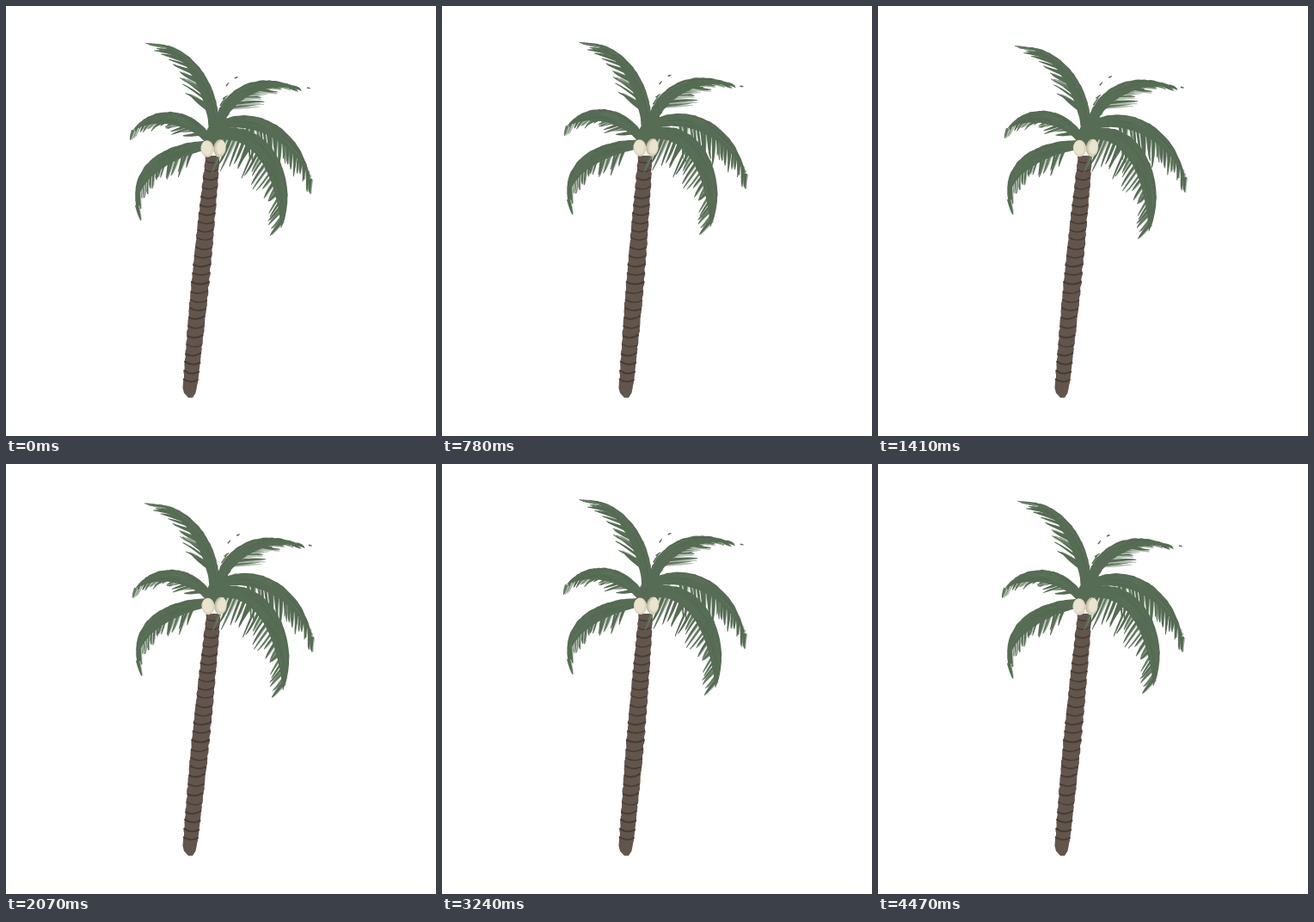
An HTML page with a canvas that plays this animation: 500x500 px, repeating every 4.5 s.

```html
<!DOCTYPE html>
<html lang="en">
<head>
<meta charset="utf-8">
<title>Swaying palm</title>
<style>
  html, body { margin: 0; width: 100%; height: 100%; overflow: hidden; background: #fff; }
  canvas { display: block; width: 100vmin; height: 100vmin; }
</style>
</head>
<body>
<canvas id="stage" width="500" height="500"></canvas>
<script>
const ctx = document.getElementById('stage').getContext('2d');
const LOOP = 4500, STEP = 30;
const KEY_TIMES = [0, 780, 1410, 2070, 2730, 3270, 3780];
const GREEN = '#566c54', DEEP = '#4c634b', SOFT = '#667b63', PALE = '#b4c0b3';
const BARK = '#62554c', RING = '#453b38';

const crownSway = { x: [0, -4, .5, 1, -1, -3.5, -2.5], y: [0, -1, -.5, -.5, 0, -.8, -.5] };

// spine: cubic control points; angle, len: leaflet values from base to tip
const fronds = [
  { spine: [[241, 152], [246, 108], [215, 44], [169, 44]], width: 8, taper: 2.5,
    range: [.2, .88], count: 19, angle: [217, 186], len: [46, 25], seed: 11,
    x: [0, -3, -4, -2, 0, -3, -2], y: [0, -1, 4, 3, 0, -2, -1] },
  { spine: [[245, 148], [252, 100], [298, 80], [343, 97]], width: 7.4, taper: 4,
    range: [.24, .93], count: 16, angle: [-10, 26], len: [40, 15], seed: 29,
    x: [0, -2, 5, 4, 0, -3, -2], y: [0, -4, -1, -1, 0, -4, -3] },
  { spine: [[236, 156], [214, 126], [172, 122], [147, 145]], width: 7.6, taper: 5,
    range: [.1, .99], count: 17, angle: [175, 108], len: [30, 13], seed: 5,
    x: [0, -2, 3, 3, 0, -3, -1], y: [0, -5, -2, 0, 0, -4, -3] },
  { spine: [[234, 162], [196, 166], [148, 188], [152, 234]], width: 8.2, taper: 5,
    range: [.14, .98], count: 19, angle: [114, 78], len: [36, 18], seed: 17,
    x: [0, -5, 0, 1, -2, -5, -4], y: [0, -7, -7, -3, 0, -5, -5] },
  { spine: [[246, 140], [290, 122], [338, 150], [355, 204]], width: 8.2, taper: 4,
    range: [.25, .98], count: 24, angle: [84, 94], len: [50, 19], seed: 41,
    x: [0, -1, 3, 2, 0, -2, 0], y: [0, -6, -2, 0, 0, -4, -4] },
  { spine: [[248, 150], [300, 139], [329, 203], [320, 258]], width: 9.6, taper: 9,
    range: [.06, .95], count: 24, angle: [112, 130], len: [48, 24], seed: 23,
    x: [0, -8, -5, 2, 0, -2, 2], y: [0, -1, 4, 5, 3, 2, 1] }
];

const mix = (a, b, u) => a + (b - a) * u;

function seeded(seed) {
  return () => {
    seed = (seed * 16807) % 2147483647;
    return seed / 2147483647;
  };
}

// Smooth periodic curve through values at KEY_TIMES
function sway(values, t) {
  const n = values.length;
  const time = k => KEY_TIMES[(k + n) % n] + Math.floor(k / n) * LOOP;
  const value = k => values[(k + n) % n];
  const slope = k => (value(k + 1) - value(k - 1)) / (time(k + 1) - time(k - 1));
  let i = n - 1;
  while (KEY_TIMES[i] > t) i--;
  const span = time(i + 1) - time(i), u = (t - time(i)) / span, v = 1 - u;
  return v * v * (1 + 2 * u) * value(i) + u * u * (3 - 2 * u) * value(i + 1)
    + span * u * v * (v * slope(i) - u * slope(i + 1));
}

const offset = (part, t) => [sway(part.x, t), sway(part.y, t)];

function bezier(p, u) {
  const v = 1 - u;
  const at = k => v * v * v * p[0][k] + 3 * v * v * u * p[1][k] + 3 * v * u * u * p[2][k] + u * u * u * p[3][k];
  const d = k => v * v * (p[1][k] - p[0][k]) + 2 * v * u * (p[2][k] - p[1][k]) + u * u * (p[3][k] - p[2][k]);
  const dx = d(0), dy = d(1), len = Math.hypot(dx, dy) || 1;
  return { x: at(0), y: at(1), nx: -dy / len, ny: dx / len };
}

function fillPath(points, color) {
  ctx.fillStyle = color;
  ctx.beginPath();
  points.forEach(([x, y]) => ctx.lineTo(x, y));
  ctx.closePath();
  ctx.fill();
}

function leaflet(x, y, angle, len, half, bend, color) {
  const c = Math.cos(angle), s = Math.sin(angle);
  const at = (along, side) => [x + c * along - s * side, y + s * along + c * side];
  ctx.fillStyle = color;
  ctx.beginPath();
  ctx.moveTo(...at(0, -half));
  ctx.quadraticCurveTo(...at(len * .7, bend - half), ...at(len, -.4));
  ctx.lineTo(...at(len, .4));
  ctx.quadraticCurveTo(...at(len * .7, bend + half), ...at(0, half));
  ctx.fill();
}

function drawFrond(f, crown, t) {
  const tip = offset(f, t), rand = seeded(f.seed * 7919);
  const spine = f.spine.map((p, i) => p.map((c, k) => c + mix(crown[k], tip[k], i / 3)));
  const half = u => f.width * (1 - u ** f.taper) * (.5 + .5 * Math.sin(Math.PI * Math.min(1, u * .9 + .08)));

  for (let i = 0; i < f.count; i++) {
    const k = i / (f.count - 1);
    const p = bezier(spine, mix(...f.range, k));
    const angle = (mix(...f.angle, k) + (rand() - .5) * 12) * Math.PI / 180;
    const len = mix(...f.len, k) * (.68 + rand() * .4);
    const bend = (rand() - .5) * 4;
    if (rand() < .6) leaflet(p.x + 2, p.y + 1, angle + .05, len * .94, 1.4, bend, PALE);
    leaflet(p.x, p.y, angle, len, 1.3 + rand() * .8, bend, rand() < .3 ? SOFT : GREEN);
  }

  const left = [], right = [];
  for (let i = 0; i <= 40; i++) {
    const u = i / 40, p = bezier(spine, u), h = half(u) + (rand() - .5) * .7;
    left.push([p.x + p.nx * h, p.y + p.ny * h]);
    right.unshift([p.x - p.nx * h, p.y - p.ny * h]);
  }
  fillPath(left.concat(right), GREEN);

  // Brush streaks along the blade
  ctx.lineWidth = .9;
  for (let i = 0; i < 10; i++) {
    const start = .12 + rand() * .55, side = rand() * 1.4 - .7;
    ctx.strokeStyle = i % 2 ? SOFT : DEEP;
    ctx.globalAlpha = .55;
    ctx.beginPath();
    for (let j = 0; j <= 6; j++) {
      const u = start + j * .035, p = bezier(spine, u), h = half(u) * side;
      ctx.lineTo(p.x + p.nx * h, p.y + p.ny * h);
    }
    ctx.stroke();
  }
  ctx.globalAlpha = 1;
}

function drawTrunk(crown) {
  const rand = seeded(9001);
  const center = y => mix(240.3, 213.7, (y - 176) / 270)
    + crown[0] * Math.max(0, (455 - y) / 280) ** 1.5;
  const half = y => 8.2 + 2 * Math.sin(Math.PI * (y - 176) / 275) + .35 * Math.sin(y * .55);
  const left = [], right = [];
  for (let y = 174; y <= 446; y += 3) {
    left.push([center(y) - half(y) + (rand() - .5) * .8, y]);
    right.unshift([center(y) + half(y) + (rand() - .5) * .8, y]);
  }
  fillPath([...left, [207, 450], [212, 455.5], [217, 455.5], [220.5, 450], ...right], BARK);

  ctx.strokeStyle = RING;
  ctx.lineCap = 'round';
  for (let y = 181; y < 444; y += 9.4 + rand() * 1.6) {
    const x = center(y), h = half(y) - .6, tilt = (rand() - .5) * 1.6;
    ctx.lineWidth = 1.3 + rand() * .8;
    ctx.beginPath();
    ctx.moveTo(x - h, y - 1 - tilt);
    ctx.quadraticCurveTo(x, y + 4, x + h, y - 1 + tilt);
    ctx.stroke();
  }
}

function ellipse(x, y, rx, ry, tilt, color) {
  ctx.fillStyle = color;
  ctx.beginPath();
  ctx.ellipse(x, y, rx, ry, tilt, 0, 7);
  ctx.fill();
}

function drawNuts([dx, dy]) {
  ellipse(248.5 + dx, 165.5 + dy, 7.2, 10.2, .12, '#d8d1b9');
  ellipse(250 + dx, 164.5 + dy, 5, 8, .12, '#e9e3cf');
  ellipse(234 + dx, 166 + dy, 7.6, 9.8, -.1, '#dcd5be');
  ellipse(233.3 + dx, 165.3 + dy, 6, 8.2, -.1, '#e9e3cf');
  ctx.strokeStyle = '#b9b095';
  ctx.lineWidth = 1;
  ctx.beginPath();
  ctx.ellipse(248.5 + dx, 165.5 + dy, 6.4, 9.2, .12, 2, 4.4);
  ctx.stroke();
}

function drawSpecks(crown, t) {
  const tip = offset(fronds[1], t);
  const speck = (x, y, angle, len, u) =>
    leaflet(x + mix(crown[0], tip[0], u), y + mix(crown[1], tip[1], u), angle, len, .8, 0, GREEN);
  speck(249, 116, -1, 11, .2);
  speck(252, 108, -.6, 7, .2);
  speck(256, 93, -.9, 5, .3);
  speck(266, 84, -.4, 4, .4);
  speck(350, 95, .2, 4, .3);
}

function draw(t) {
  const crown = offset(crownSway, t);
  ctx.fillStyle = '#fff';
  ctx.fillRect(0, 0, 500, 500);
  drawTrunk(crown);
  drawSpecks(crown, t);
  ellipse(242 + crown[0], 151 + crown[1], 10, 13, 0, GREEN);
  fronds.forEach(f => drawFrond(f, crown, t));
  drawNuts(crown);
}

function frame() {
  draw(Math.floor(performance.now() % LOOP / STEP) * STEP);
  requestAnimationFrame(frame);
}
frame();
</script>
</body>
</html>
```
